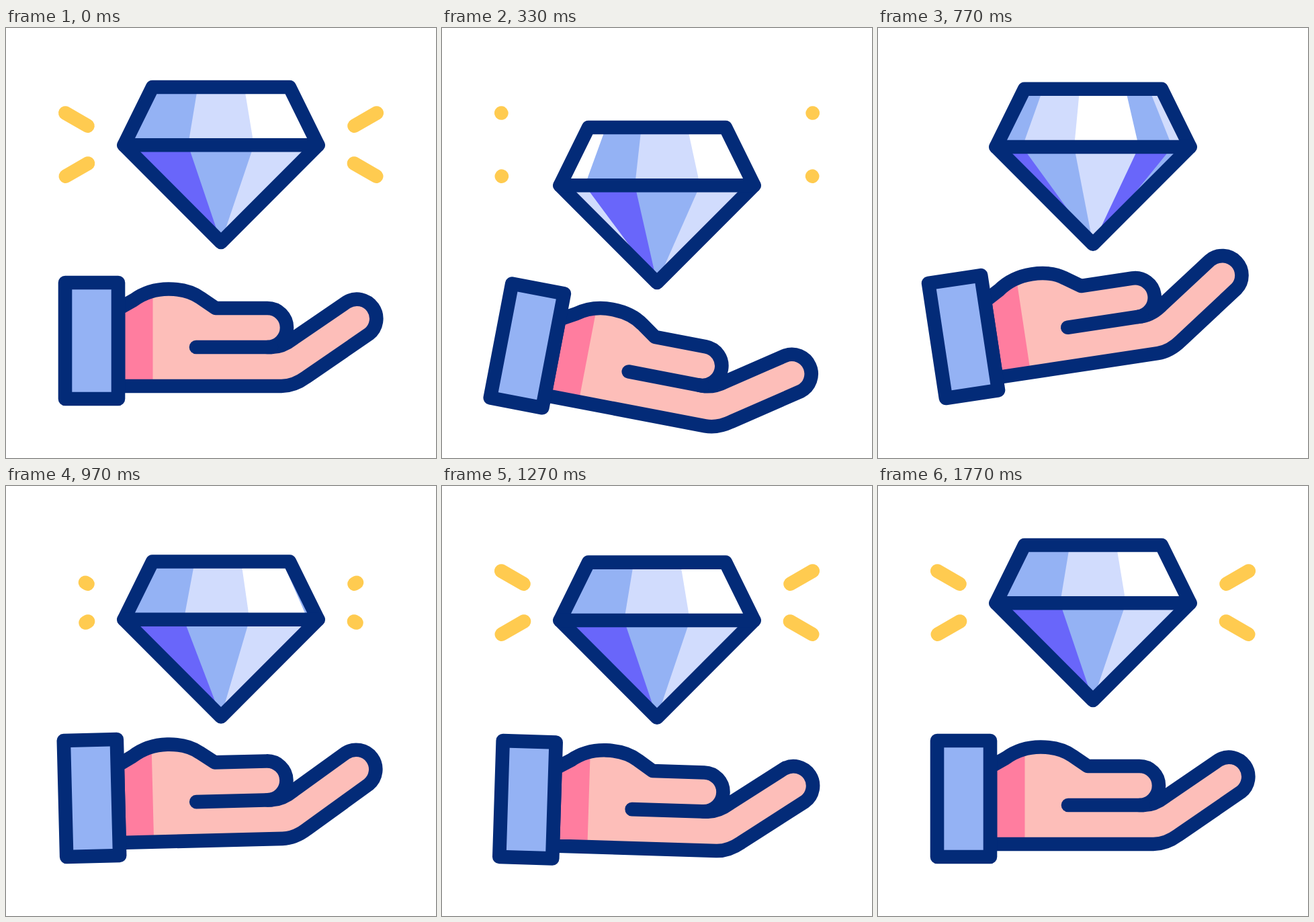
Write an HTML page that moves like this. It is 640 px wide and 640 px high and loops after 2000 ms.

```html
<!DOCTYPE html>
<html lang="en">
<head>
<meta charset="utf-8">
<title>Diamond over an open hand</title>
<style>
  html, body { margin: 0; width: 100%; height: 100%; overflow: hidden; background: #fff; }
  svg { display: block; width: 100vw; height: 100vh; }
  .line { fill: none; stroke: #032b78; stroke-width: 20.6; stroke-linecap: round; stroke-linejoin: round; }
  .spark { stroke: #ffcb50; stroke-width: 20.6; stroke-linecap: round; }
</style>
</head>
<body>
<svg viewBox="0 0 640 640">
  <defs>
    <path id="palm" d="M167 418 L190 405 C205 394 223 388.5 242 388.5 C264 388.5 279 394 290 402 L312 417 H389
      A29 29 0 0 1 389 475 H395 C408 475 419 469 428 462 L507 408 A29 29 0 0 1 540 455.6
      L447 519.5 C436 527.5 424 533 410 533 H167 Z"/>
    <path id="gem" d="M218 88 H422 L464.5 174.3 L320 319 L175.5 174.3 Z"/>
    <clipPath id="palmClip"><use href="#palm"/></clipPath>
    <clipPath id="gemClip"><use href="#gem"/></clipPath>
  </defs>
  <g id="hand">
    <use href="#palm" fill="#fdbeb9"/>
    <rect x="160" y="370" width="58.5" height="170" fill="#ff7d9f" clip-path="url(#palmClip)"/>
    <use href="#palm" class="line"/>
    <path class="line" d="M283 475 H395"/>
    <rect x="88" y="379" width="79" height="173" fill="#94b2f4"/>
    <rect x="88" y="379" width="79" height="173" class="line"/>
  </g>
  <g id="sparks"></g>
  <g id="diamond">
    <g id="facets" clip-path="url(#gemClip)"></g>
    <use href="#gem" class="line"/>
    <path class="line" d="M175.5 174.3 H464.5"/>
  </g>
</svg>
<script>
const FPS = 30, LOOP = 2000;
const $ = id => document.getElementById(id);
const clamp = (v, lo, hi) => Math.min(hi, Math.max(lo, v));

function add(parent, tag, attrs) {
  const el = document.createElementNS("http://www.w3.org/2000/svg", tag);
  set(el, attrs);
  return parent.appendChild(el);
}
function set(el, attrs) {
  for (const name in attrs) el.setAttribute(name, attrs[name]);
}

// Monotone cubic through [frame, value] keys; flat at extremes and ends.
function track(keys) {
  const slope = i => (keys[i + 1][1] - keys[i][1]) / (keys[i + 1][0] - keys[i][0]);
  const tangents = keys.map((_, i) => {
    if (i === 0 || i === keys.length - 1) return 0;
    const a = slope(i - 1), b = slope(i);
    return a * b <= 0 ? 0 : 2 * a * b / (a + b);
  });
  return f => {
    if (f <= keys[0][0]) return keys[0][1];
    const i = keys.findIndex((k, n) => n < keys.length - 1 && f < keys[n + 1][0]);
    if (i < 0) return keys[keys.length - 1][1];
    const [f0, v0] = keys[i], [f1, v1] = keys[i + 1];
    const d = f1 - f0, u = (f - f0) / d, ease = u * u * (3 - 2 * u);
    return v0 + (v1 - v0) * ease
      + d * u * (1 - u) * (tangents[i] * (1 - u) - tangents[i + 1] * u);
  };
}

const drop = track([[0, 0], [10, 60], [22, 2], [34, 38], [44.5, 0]]);
const tilt = track([[0, 0], [12, 11.7], [23, -8.6], [34, 4], [43, -1.3], [53, 0]]);
const spin = track([[6, 0], [10, .17], [16, .87], [23, 2.22], [29, 2.93], [32, 3]]);
const shrink = track([[0, 0], [10.3, 1]]);
const grow = track([[27, 0], [37, 1]]);

const CROWN = ["#94b2f4", "#d1dcfd", "#ffffff"];
const PAVILION = ["#6966fa", "#94b2f4", "#d1dcfd"];
const FIRST = -4, LAST = 3;

// Each facet reaches to the right edge; the next one covers its surplus.
const facets = [];
for (let i = FIRST; i <= LAST; i++) {
  const color = (i + 6) % 3;
  facets.push({
    i,
    crown: add($("facets"), "path", { fill: CROWN[color] }),
    pavilion: add($("facets"), "path", { fill: PAVILION[color] })
  });
}

// Inner end, then outer end, for the left side; the right side mirrors it.
const sparks = [];
for (const [x0, y0, x1, y1] of [[121.5, 145.7, 88.3, 126.5], [122, 201.5, 88.8, 220.7]])
  for (const mirror of [x => x, x => 640 - x])
    sparks.push({ x0: mirror(x0), y0, x1: mirror(x1), y1, el: add($("sparks"), "line", { class: "spark" }) });

function edgeOffset(i, turn) {
  if (i === FIRST) return -160;
  const v = i + turn - 1.5, limit = i === 1 ? 1.75 : 1.37;
  const round = 118.7 * Math.sin(clamp(.85 * v, -Math.PI / 2, Math.PI / 2));
  const push = 300 * Math.max(0, Math.abs(v) - limit);
  return clamp(round + Math.sign(v) * push, -160, 160);
}

function drawFacets(turn) {
  for (const { i, crown, pavilion } of facets) {
    const off = edgeOffset(i, turn), x = 320 + off, top = 320 + off * .708;
    set(crown, { d: `M${top} 88 H480 V174.3 H${x} Z` });
    set(pavilion, { d: `M${x} 174.3 H480 V319 H320 Z` });
  }
}

function drawSparks(f) {
  const from = f < 20 ? shrink(f) : 0;
  const to = f < 20 ? 1 : grow(f);
  $("sparks").style.display = from < to ? "" : "none";
  for (const { x0, y0, x1, y1, el } of sparks) {
    const x = k => x0 + (x1 - x0) * k, y = k => y0 + (y1 - y0) * k;
    set(el, { x1: x(from), y1: y(from), x2: x(to), y2: y(to) });
  }
}

function render(ms) {
  const f = Math.floor((ms % LOOP + 4) * FPS / 1000);
  set($("hand"), { transform: `rotate(${tilt(f)} 88 465.5)` });
  set($("diamond"), { transform: `translate(0 ${drop(f)})` });
  drawFacets(spin(f));
  drawSparks(f);
}

const start = performance.now();
function tick() {
  render(performance.now() - start);
  requestAnimationFrame(tick);
}
tick();
</script>
</body>
</html>
```
